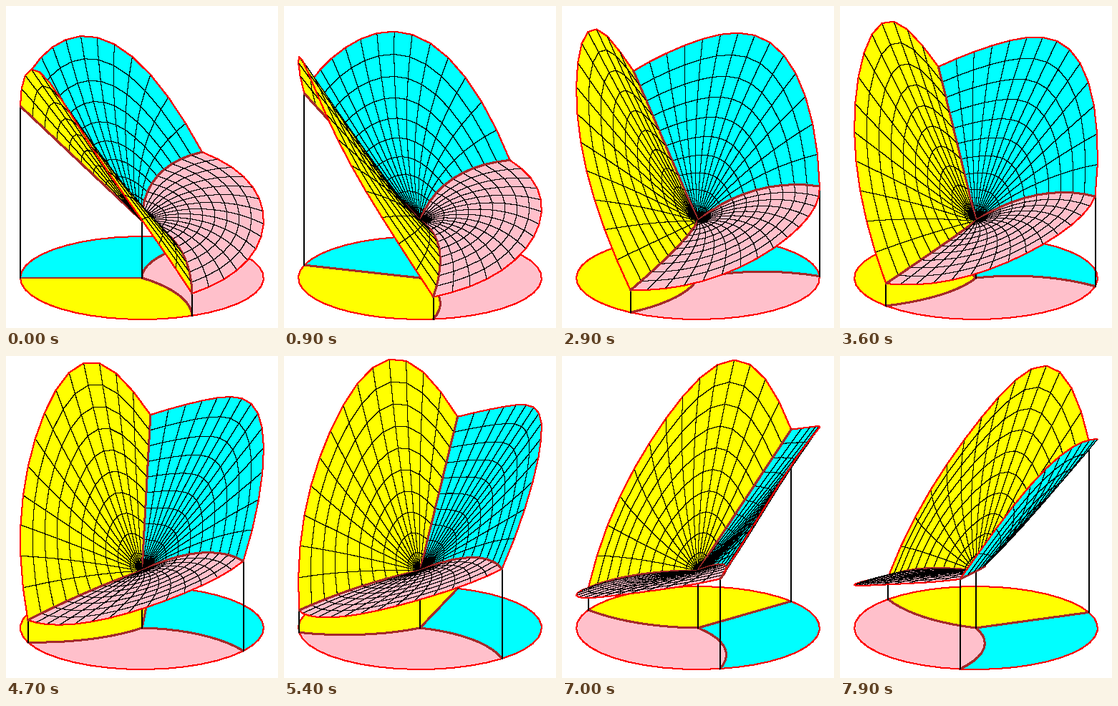
A matplotlib script that plays this animation: 380 by 450 pixels, repeating every 8000 ms.

```python
import numpy as np
import matplotlib.pyplot as plt
from matplotlib.animation import FuncAnimation
from matplotlib.collections import PolyCollection
from matplotlib.colors import to_rgba

W, H, DPI = 380, 450, 100
CX, CY, RX, RY = 190, 380, 170, 58
FRAMES, STEP = 80, 2.0
NR, NT = 10, 14
PX = 72 / DPI
TILT = np.arcsin(RY / RX)
ZPX = RX * np.cos(TILT)

CLEAR = (0, 0, 0, 0)
BLACK, RED, BROWN = map(to_rgba, ("black", "red", "brown"))
# aliased strokes fill every pixel they touch, about one more than their width
THIN, RIM, CURVE = 0.02, 1.0, 2.0

r = np.linspace(0, 1, NR + 1)[:, None]
t = np.linspace(0, 1, NT + 1)[None, :]

# dividing curves: angle in degrees and height in pixels over the radius
back = (180 + 0 * r, 80 + 160 * r)
front = (41.3 + 24.4 * r, 80 - 49 * r**2)
right = (-90.4 + 30 * r, 80 + 45.5 * (2 * r - r**2))
right_up = (right[0] + 360, right[1])


def sheet(a, b, waves, power):
    """Polar mesh between two dividing curves, raised by sine waves."""
    angle = a[0] + (b[0] - a[0]) * t
    height = a[1] + (b[1] - a[1]) * t
    bump = sum(c * np.sin((k + 1) * np.pi * t) for k, c in enumerate(waves))
    return np.radians(angle), height + bump * r**power


SHEETS = [
    (sheet(front, back, (137.5, -29, 7), 1.22), to_rgba("yellow")),
    (sheet(back, right_up, (104, -12.5, -1), 1.75), to_rgba("cyan")),
    (sheet(right, front, (0, 4.5), 1.5), to_rgba("pink")),
]


def project(x, y, h):
    return np.stack([CX + RX * x, CY + RY * y - h], axis=-1)


def outline(p):
    return np.concatenate([p[:, 0], p[-1, 1:], p[-2::-1, -1]])


def scene(n):
    """Items (points, face, edge, width) from back to front."""
    turn = np.radians(STEP * n)
    fills, rims, curves, posts, solid = [], [], [], [], []
    edges = {}

    for i, ((angle, h), color) in enumerate(SHEETS):
        x, y = r * np.cos(angle + turn), r * np.sin(angle + turn)
        flat, top = project(x, y, 0), project(x, y, h)

        fills.append((outline(flat), color, color, THIN))
        rims.append((flat[-1], CLEAR, RED, RIM))
        curves.append((flat[:, 0], CLEAR, BROWN, CURVE))
        posts.append((np.array([flat[-1, 0], top[-1, 0]]), CLEAR, BLACK, THIN))

        d = y * np.cos(TILT) + h / ZPX * np.sin(TILT)
        depth = (d[:-1, :-1] + d[1:, :-1] + d[1:, 1:] + d[:-1, 1:]) / 4
        for j in range(NR):
            for k in range(NT):
                quad = np.array([top[j, k], top[j + 1, k], top[j + 1, k + 1],
                                 top[j, k + 1], top[j, k]])
                solid.append((depth[j, k], (quad, color, BLACK, THIN)))
        for k in range(NT):
            solid.append((depth[-1, k] + 1e-4,
                          (top[-1, k:k + 2], CLEAR, RED, RIM)))
        # a dividing curve lies in front of both sheets it joins
        for j in range(NR):
            for key, col, seg in (((i, j), 0, top[j:j + 2, 0]),
                                  (((i + 1) % 3, j), -1, top[j:j + 2, -1])):
                near = max(depth[j, col], edges.get(key, (-9,))[0])
                edges[key] = (near, seg)

    for near, seg in edges.values():
        solid.append((near + 2e-4, (seg, CLEAR, BROWN, CURVE)))
    solid.sort(key=lambda item: item[0])

    center = project(np.zeros(2), np.zeros(2), np.array([0, 80]))
    posts.append((center, CLEAR, BLACK, THIN))
    return fills + rims + curves + posts + [item for _, item in solid]


fig = plt.figure(figsize=(W / DPI, H / DPI), dpi=DPI, facecolor="white")
ax = fig.add_axes([0, 0, 1, 1])
ax.set_xlim(0, W)
ax.set_ylim(H, 0)
ax.axis("off")
art = PolyCollection([], closed=False, antialiaseds=False, capstyle="round")
ax.add_collection(art, autolim=False)


def draw(n):
    points, faces, lines, widths = zip(*scene(n))
    art.set_verts(points, closed=False)
    art.set_facecolor(faces)
    art.set_edgecolor(lines)
    art.set_linewidth([w * PX for w in widths])
    return [art]


anim = FuncAnimation(fig, draw, frames=FRAMES, interval=100,
                     init_func=lambda: draw(0), repeat=True, repeat_delay=0)
plt.show()
```
